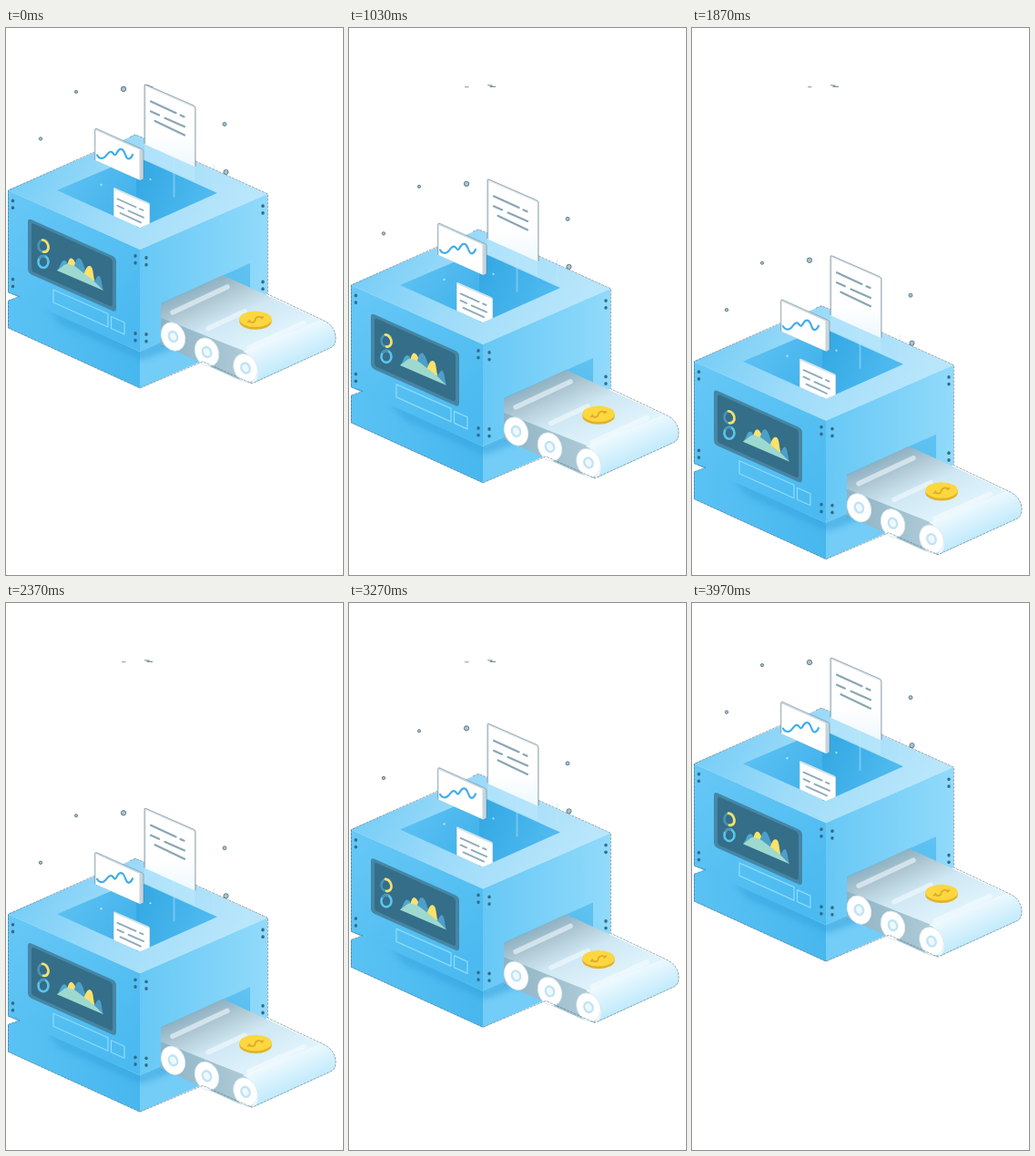
An HTML page for the animation above (4.01 s loop, 370x600 px).

```html
<!DOCTYPE html>
<html lang="en">
<head>
<meta charset="utf-8">
<title>Data machine</title>
<style>
html, body { margin: 0; width: 100%; height: 100%; overflow: hidden; background: #fff; }
svg { display: block; width: 370px; height: 600px; }
.line { fill: none; stroke-linecap: round; stroke-linejoin: round; }
.edge { fill: none; stroke: #46606d; stroke-width: .8; stroke-opacity: .65; stroke-linejoin: round; }
</style>
</head>
<body>
<svg viewBox="0 0 370 600">
  <defs>
    <linearGradient id="rim" x1="0" y1="0" x2="1" y2=".25">
      <stop offset="0" stop-color="#6bc9f6"/><stop offset=".5" stop-color="#9ddbf9"/><stop offset="1" stop-color="#b9e6fb"/>
    </linearGradient>
    <linearGradient id="left" x1="0" y1="0" x2=".6" y2="1">
      <stop offset="0" stop-color="#67c8f6"/><stop offset="1" stop-color="#4bbaf0"/>
    </linearGradient>
    <linearGradient id="right" x1="0" y1="0" x2="1" y2="0">
      <stop offset="0" stop-color="#67c8f5"/><stop offset="1" stop-color="#91dafb"/>
    </linearGradient>
    <linearGradient id="base" x1="0" y1="0" x2="1" y2="0">
      <stop offset="0" stop-color="#5ac2f4"/><stop offset="1" stop-color="#47b7ee"/>
    </linearGradient>
    <linearGradient id="wallLeft" x1="0" y1="0" x2="1" y2=".6">
      <stop offset="0" stop-color="#62c4f4"/><stop offset="1" stop-color="#42b2eb"/>
    </linearGradient>
    <linearGradient id="wallRight" x1="0" y1="0" x2="1" y2=".4">
      <stop offset="0" stop-color="#31a6e2"/><stop offset="1" stop-color="#50bbf0"/>
    </linearGradient>
    <linearGradient id="mouth" x1="0" y1="1" x2="1" y2="0">
      <stop offset="0" stop-color="#48aee0"/><stop offset="1" stop-color="#5fc3f3"/>
    </linearGradient>
    <linearGradient id="belt" gradientUnits="userSpaceOnUse" x1="204" y1="287" x2="242" y2="371">
      <stop offset="0" stop-color="#8fb2c3"/><stop offset=".25" stop-color="#b4ccd7"/><stop offset=".5" stop-color="#cfe8f4"/><stop offset="1" stop-color="#e2f5fd"/>
    </linearGradient>
    <linearGradient id="lip" gradientUnits="userSpaceOnUse" x1="302" y1="338" x2="316" y2="370">
      <stop offset="0" stop-color="#eef9fe"/><stop offset=".45" stop-color="#d9f2fd"/><stop offset="1" stop-color="#c0eafc"/>
    </linearGradient>
    <linearGradient id="side" x1="0" y1="0" x2="1" y2="0">
      <stop offset="0" stop-color="#8eb3c4"/><stop offset="1" stop-color="#b3ced9"/>
    </linearGradient>
    <linearGradient id="sheet" x1="0" y1="0" x2="0" y2="1">
      <stop offset=".6" stop-color="#fff"/><stop offset="1" stop-color="#eef8fd"/>
    </linearGradient>
    <filter id="soft" x="-20%" y="-50%" width="140%" height="200%"><feGaussianBlur stdDeviation="3"/></filter>
    <clipPath id="baseClip"><path d="M2 299L15 294.500L147 355L216 325V365L147 395L2 329Z"/></clipPath>
  </defs>

  <!-- marks that stay in place -->
  <path class="line" d="M127.500 64.800h3.500M152.500 62.800l4.500 .3M155 64.400h5.500" stroke="#7f949e" stroke-width="1.100"/>

  <g id="machine">
    <g id="bits"></g>

    <!-- base -->
    <path d="M2 299L15 294.500L147 355V395L2 329Z" fill="url(#base)"/>
    <path d="M147 352L216 322V365L147 395Z" fill="#73cdf7"/>
    <path d="M45 308L147 352L190 334V349L149 364L60 325Z" fill="#319fdb" opacity=".5" filter="url(#soft)" clip-path="url(#baseClip)"/>

    <!-- box -->
    <path d="M2 178L142 117L287 182L147 243Z" fill="url(#rim)"/>
    <path d="M2 178L147 243V355L2 290Z" fill="url(#left)"/>
    <path d="M147 243L287 182V292L147 354Z" fill="url(#right)"/>

    <!-- hopper -->
    <path d="M56 178L143 141V218L147 219Z" fill="url(#wallLeft)"/>
    <path d="M143 141L232 181L147 219L143 217.500Z" fill="url(#wallRight)"/>
    <path class="line" d="M184.500 142V185M228.500 150V177" stroke="#b8e6fb" stroke-width="2" opacity=".4"/>
    <path d="M152 127L207 152V168L152 144Z" fill="#c6ebfc" opacity=".4"/>
    <g fill="#a9e2fb"><circle cx="104.500" cy="172" r="1.200"/><circle cx="158.500" cy="166" r="1.100"/></g>

    <!-- large sheet -->
    <path d="M152 63Q152 61.500 154 62.300L206 85Q208 86 208 88V152.500L152 127.500Z" fill="#dbe6eb"/>
    <path d="M153.500 64L207 87.400V152L153.500 128Z" fill="url(#sheet)"/>
    <path class="edge" d="M152 127V63Q152 61.500 154 62.300L206 85Q208 86 208 88V152"/>
    <path class="line" d="M159 80.500L186.500 93.200M191.500 95.600L195.500 97.400M159 91.500L168 95.500M174.500 98.700L196 108.200M163.500 102L196 117.500" stroke="#89a6b4" stroke-width="2.200"/>

    <!-- chart card -->
    <path d="M97.500 112Q97.500 109.500 100 110.500L149 132.500Q151 133.500 151 135V165L147.500 167L97.500 145Z" fill="#c5d5dd"/>
    <path d="M98.500 112L146.500 133.500V166.500L98.500 145Z" fill="#fff"/>
    <path class="edge" d="M97.500 145V112Q97.500 109.500 100 110.500L149 132.500Q151 133.500 151 135V165" opacity=".7"/>
    <path class="line" d="M100 139.500C102 143.500 106 144 109 141C112 138 113 134.500 116 136C119 138 119 141 121 138C123 134.500 125 131.500 128 133.500C132 137 131 144 135 143.500C137 143 138 141.500 139 139" stroke="#42ade8" stroke-width="2.200"/>

    <!-- small sheet -->
    <path d="M118 176.500Q118 174.500 120 175.400L156 191.200Q158 192 158 194V214.500L147 219L118 206Z" fill="#d5e2e8"/>
    <path d="M119 177L157 193.700V214.700L147 219L119 206.400Z" fill="#fff"/>
    <path class="line" d="M122.500 187.500L142.500 196.500M147 198.500L150.500 200M122.500 195L129 198M134.500 200.500L151 207.800M125.500 203L148 213.300" stroke="#8fabb9" stroke-width="1.900"/>

    <!-- display -->
    <path d="M24 213Q24 208.500 28 210.300L117 250Q121 252 121 256V307Q121 312 117 310.300L28 270.500Q24 268.500 24 264Z" fill="#4686a5"/>
    <path d="M28 217Q28 213.500 31 215L114 252Q117 253.500 117 257V303Q117 306.500 114 305L31 268Q28 266.500 28 263Z" fill="#346e89"/>
    <g class="line" stroke-width="2.600">
      <ellipse cx="41" cy="239" rx="5.500" ry="6.500" stroke="#4b93b5"/>
      <path d="M40 232.500C44.500 233 47 238 46.500 242Q45 246.500 41 245.500" stroke="#ffe169"/>
      <ellipse cx="41" cy="256.500" rx="5.500" ry="6.500" stroke="#5cc4ee"/>
      <path d="M37 252Q39 249.500 42 250.500" stroke="#4b93b5"/>
    </g>
    <path d="M56 266C60 262 60 255 64 255C67 255 68 261 70 264V271Z" fill="#4fa9cf"/>
    <path d="M64 264C68 262 68 252.500 71.500 252.500C75 253 76 258 78 262V274Z" fill="#ffe169"/>
    <path d="M72 266C76 262 76 252 80 252.500C85 253 86 268 91 272V279Z" fill="#4d9fc9"/>
    <path d="M84 272C88 266 88 260.500 92 261C97 262 95 275 99 281V284Z" fill="#ffe169"/>
    <path d="M96 278C99 276 100 271 102.500 272C105 274 105 282 107 288Z" fill="#4d9fc9"/>
    <path d="M56 266L62 261.500C66 258 68 259 72 260C76 261 79 264 83 267C88 271 93 274 99 280L107 288Z" fill="#9ed9d0"/>

    <!-- slots -->
    <path class="line" d="M52 287L112 313.500V328L52 301ZM115.500 316.500L130 323V336L115.500 329.500Z" stroke="#8ddcfd" stroke-width="1.200"/>

    <g id="screws" fill="#356a88"></g>

    <!-- outlet -->
    <path d="M170 302L268 258V300L170 350Z" fill="url(#mouth)"/>

    <!-- conveyor -->
    <path d="M170 318L262 354L277 373L270 390L256 386L170 347Z" fill="url(#side)"/>
    <path d="M170 302.500L238 271L349 322L266 356L170 318Z" fill="url(#belt)"/>
    <path d="M260 355L346 320C356 323 362 332 362 340Q362 348 357 350.500L271 390C280 384 280 362 260 355Z" fill="url(#lip)"/>
    <g class="line" stroke-width="5.500">
      <path d="M183 312L243 284" stroke="#dce9f0" opacity=".85"/>
      <path d="M222 329.500L262 311" stroke="#eef8fd" opacity=".7"/>
      <path d="M267 350.500L327 323.500" stroke="#f0fafe" opacity=".8"/>
    </g>
    <g id="rollers"></g>

    <!-- coin -->
    <path d="M256.300 319.300V322A17.700 8.800 0 0 0 291.700 322V319.300Z" fill="#e3b12b"/>
    <ellipse cx="274" cy="319.300" rx="17.700" ry="8.800" fill="#fdd73f"/>
    <path class="line" d="M267 320.500C267.500 324 273 323.500 273.500 320.500C274 316.500 279.500 315.500 281 318.500M265.500 322.500L268 321.500M280 318L282.500 317" stroke="#dcac2a" stroke-width="1.700"/>

    <!-- silhouette -->
    <path class="edge" stroke-dasharray="3 1" d="M208 146L287.500 182V292L349 321C358 325 362 333 362 340Q362 348 357 350.500L270 390L216 366L147 395L2.500 329V299L15 294.500L2.500 290V178L97 136M136 119.500L142 117L152 121"/>
  </g>
</svg>
<script>
const NS = "http://www.w3.org/2000/svg";
const byId = id => document.getElementById(id);

function add(parent, tag, attrs) {
  const node = document.createElementNS(NS, tag);
  for (const name in attrs) node.setAttribute(name, attrs[name]);
  byId(parent).appendChild(node);
}

for (const [x, y, r] of [[77, 70, 1.6], [129, 67, 2.7], [38, 121.5, 1.7], [240, 105.5, 2], [241.5, 158, 2.6]])
  add("bits", "circle", { cx: x, cy: y, r, fill: "#a6c3d0", stroke: "#5c7582", "stroke-width": .9 });

for (const [x, top, bottom] of [[7.5, 189.5, 275.7], [142, 250, 335], [154, 252, 336], [282, 195.2, 278.5]])
  for (const y of [top, top + 7.7, bottom, bottom + 7.7])
    add("screws", "ellipse", { cx: x, cy: y, rx: 1.7, ry: 1.9 });

for (const [x, y] of [[183.5, 338.5], [220.5, 355.5], [263, 373]]) {
  const at = { cx: x, cy: y, transform: `rotate(-24 ${x} ${y})` };
  add("rollers", "ellipse", { ...at, rx: 12.7, ry: 16.2, fill: "#fff", stroke: "#d3e3eb", "stroke-width": .7 });
  add("rollers", "ellipse", { ...at, rx: 4.5, ry: 5.6, fill: "#eef8fd", stroke: "#bfe3f5", "stroke-width": 2.4 });
}

const LOOP = 4010, LAST = 119, TURN = 60;
const DOWN = 3.352, UP = 3.44;
const machine = byId("machine");

// 30 steps a second: down to the turn, then back up.
function draw() {
  const time = performance.now() % LOOP;
  const step = Math.min(LAST, Math.floor((time + 4) * .03));
  const y = Math.min(step, TURN) * DOWN - Math.max(0, step - TURN) * UP;
  machine.setAttribute("transform", `translate(0 ${y.toFixed(2)})`);
  requestAnimationFrame(draw);
}
draw();
</script>
</body>
</html>
```
